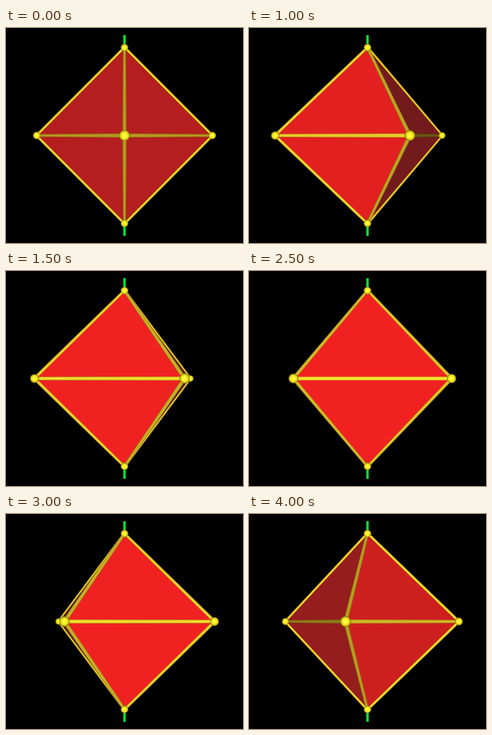
An HTML page with a canvas for the animation above (4.5 s loop, 297 px wide and 269 px high).

```html
<!DOCTYPE html>
<html lang="en">
<head>
<meta charset="utf-8">
<title>Rotating octahedron</title>
<style>
  html, body { margin: 0; width: 100%; height: 100%; overflow: hidden; background: #000; }
  canvas { display: block; }
</style>
</head>
<body>
<canvas id="stage" width="297" height="269"></canvas>
<script>
const ctx = document.getElementById('stage').getContext('2d');
const CX = 148.5, CY = 134.5, RADIUS = 110, CAMERA = 354;
const ROD_RADIUS = 1.8, BALL_RADIUS = 4.7;
const STEP_MS = 500, STEPS = 9;

const rgb = (r, g, b) => `rgb(${Math.round(r)},${Math.round(g)},${Math.round(b)})`;

function project(x, y, z) {
  const scale = CAMERA / (CAMERA - z);
  return { x: CX + x * scale, y: CY + y * scale, z, scale, faces: [] };
}

function polygon(points, color) {
  ctx.fillStyle = color;
  ctx.beginPath();
  for (const [x, y] of points) ctx.lineTo(x, y);
  ctx.closePath();
  ctx.fill();
}

// A rod that tapers with perspective, with darker sides.
function drawRod({ a, b }, width = 1) {
  const dx = b.x - a.x, dy = b.y - a.y, length = Math.hypot(dx, dy);
  if (length < 1) return;
  const slope = (b.z - a.z) / (RADIUS * Math.SQRT2);
  const light = Math.sqrt(1 - slope * slope);
  const layer = (halfWidth, shade) => {
    const nx = -dy / length * halfWidth, ny = dx / length * halfWidth;
    polygon([
      [a.x + nx * a.scale, a.y + ny * a.scale],
      [b.x + nx * b.scale, b.y + ny * b.scale],
      [b.x - nx * b.scale, b.y - ny * b.scale],
      [a.x - nx * a.scale, a.y - ny * a.scale]
    ], rgb(255 * shade, 228 * shade ** 1.15, 44 * shade));
  };
  layer(ROD_RADIUS * width, light * 0.72);
  layer(ROD_RADIUS * width * 0.75, light);
}

function drawBall({ x, y, scale }) {
  const r = BALL_RADIUS * scale;
  const fill = ctx.createRadialGradient(x, y, 0, x, y, r);
  fill.addColorStop(0, '#ffff4a');
  fill.addColorStop(0.35, '#fff82c');
  fill.addColorStop(0.75, '#dfcf1c');
  fill.addColorStop(1, '#6f6508');
  ctx.fillStyle = fill;
  ctx.beginPath();
  ctx.arc(x, y, r, 0, Math.PI * 2);
  ctx.fill();
}

function drawScene(angle) {
  ctx.fillStyle = '#000';
  ctx.fillRect(0, 0, 297, 269);
  ctx.fillStyle = '#00e632';
  ctx.fillRect(147, 9, 3, 251);

  const poles = [project(0, -RADIUS, 0), project(0, RADIUS, 0)];
  const ring = [0, 1, 2, 3].map(i => {
    const turn = angle + i * Math.PI / 2;
    return project(RADIUS * Math.sin(turn), 0, RADIUS * Math.cos(turn));
  });

  const faces = [], rods = [];
  ring.forEach((a, i) => {
    const b = ring[(i + 1) % 4];
    if (b.x <= a.x) return;
    const face = { a, b, light: Math.max(0, Math.cos(angle + (i + 0.5) * Math.PI / 2)) };
    faces.push(face);
    a.faces.push(face);
    b.faces.push(face);
    rods.push({ a, b });
  });

  // Rods on the outline are partly sunk into the face beside them.
  const outline = [];
  for (const a of ring) {
    for (const b of poles) {
      if (a.faces.length === 2) rods.push({ a, b });
      if (a.faces.length === 1) outline.push({ a, b, exposed: a.faces[0].light * 0.8 });
    }
  }

  outline.forEach(rod => drawRod(rod));
  for (const { a, b, light } of faces) {
    const color = rgb(Math.min(242, 18 + 230 * light), 23 + 10 * light, 24 + 9 * light);
    for (const pole of poles) polygon([[a.x, a.y], [b.x, b.y], [pole.x, pole.y]], color);
  }
  outline.forEach(rod => drawRod(rod, rod.exposed));
  rods.sort((p, q) => p.a.z + p.b.z - q.a.z - q.b.z).forEach(rod => drawRod(rod));

  [...poles, ...ring.filter(v => v.faces.length)]
    .sort((p, q) => p.z - q.z)
    .forEach(drawBall);
}

function tick() {
  const step = Math.floor(performance.now() / STEP_MS) % STEPS;
  drawScene(step * Math.PI / 2 / STEPS);
  requestAnimationFrame(tick);
}
tick();
</script>
</body>
</html>
```
